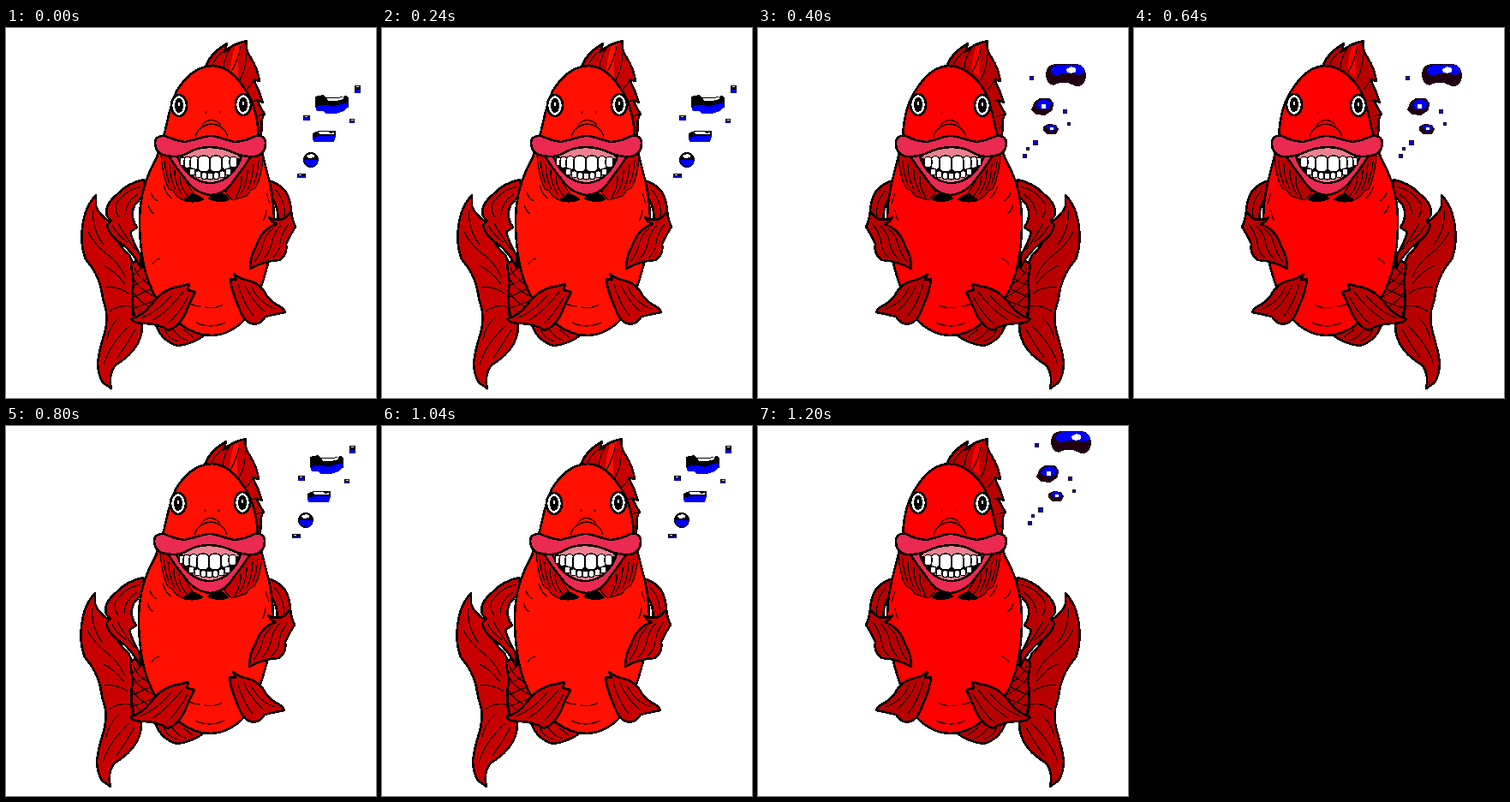
Recreate the animation shown at these times as an HTML page. Size 432 by 432 pixels, loop 1600 ms.

```html
<!DOCTYPE html>
<html lang="en">
<head>
<meta charset="utf-8">
<title>Smiling fish</title>
<style>
html, body { margin: 0; width: 100%; height: 100%; overflow: hidden; background: #fff; }
svg { display: block; width: 100vw; height: 100vh; shape-rendering: crispEdges; }
#fish { stroke: #000; stroke-width: 2.6; stroke-linejoin: round; stroke-linecap: round; }
.fin { fill: var(--fin); }
.body { fill: var(--body); }
.lip { fill: #ea2a50; }
.gum { fill: #ee8090; }
.white { fill: #fff; }
.line { fill: none; stroke-width: 1.2; }
.thin { stroke-width: 1.2; }
.plain { stroke: none; }
.blue { fill: #00f; }
#glossy { fill: #200010; }
</style>
</head>
<body>
<svg viewBox="0 0 432 432">
  <g id="fish">
    <g id="dorsal">
      <path class="fin" d="M233 45Q239 29 258 18L255 28Q265 18 281 15Q279 26 286 35Q294 48 296 62L289 60Q296 74 300 87L293 84Q298 95 302 100Q297 107 299 115L297 131L262 85Z"/>
      <path class="body plain" d="M262 50Q263 33 268 21L275 19Q270 36 271 57Z"/>
      <path class="line" d="M241 43Q246 32 255 27M254 46Q255 34 262 24M263 51Q271 38 274 21M273 61Q281 45 281 29M281 72Q287 66 289 60M288 86L293 84M292 103L300 101M294 117L299 115"/>
    </g>

    <g id="torso">
      <!-- tail -->
      <path class="fin" d="M105 195Q94 207 91 222Q85 249 93 270Q107 286 111 304Q113 318 117 330Q119 347 113 363Q109 377 107 390Q107 404 113 414L123 421Q119 407 127 394Q147 382 154 368Q161 354 158 341L149 337Q145 318 149 297Q152 281 144 265Q128 252 124 228Q109 219 105 208Z"/>
      <path class="line" d="M102 213Q100 235 114 253M96 238Q104 254 118 264Q132 274 140 292M113 277Q127 283 139 299M116 303Q131 301 143 310M121 331Q132 323 145 325M118 363Q121 347 133 337M114 393Q121 369 145 347M130 385Q141 370 151 352"/>
      <path class="fin" d="M146 276Q151 270 158 274L174 302L183 326L151 339Q145 320 149 298Z"/>
      <path class="line" d="M149 288Q157 283 160 278M149 301Q160 296 167 291M149 314Q164 307 173 303M149 327Q168 321 179 315M150 280Q154 292 169 300M150 294Q156 306 177 315M149 309Q156 321 171 327M149 323L160 334"/>

      <!-- arms behind the body -->
      <path class="fin" d="M161 177Q142 181 130 194Q114 207 118 220L123 225L118 230Q120 241 131 249Q148 260 158 281L157 265Q148 250 145 238L153 233Q144 220 150 207L163 192Z"/>
      <path class="line" d="M157 185Q138 190 129 205Q126 213 132 221M154 194Q140 203 139 218M124 230Q131 243 142 250M131 228Q138 241 151 259"/>
      <path class="fin" d="M307 178Q325 184 330 198Q334 210 333 222L317 227Q320 211 309 196Z"/>
      <path class="line" d="M314 188Q327 202 325 220"/>
      <path class="fin" d="M174 344Q181 366 201 371Q218 369 236 356L207 340Z"/>
      <path class="line" d="M185 352Q190 363 201 366M195 352Q203 363 212 365M207 352L219 361"/>

      <!-- body -->
      <path class="body" d="M242 44C222 44 207 60 199 74C191 91 189 108 185 123L176 151Q160 179 157 207C154 236 158 269 164 289C173 317 187 335 204 346Q221 359 240 359Q262 358 278 341C292 321 303 291 309 261C315 233 314 207 308 181L300 149L295 127C294 105 288 82 276 67Q262 46 242 44Z"/>
      <path class="line" d="M166 207Q168 214 173 217M169 192Q171 199 177 202M184 184Q188 196 194 199M304 193L308 205M304 213Q303 222 300 225M180 269Q174 270 171 276M182 307Q186 313 193 312M211 319Q218 325 227 325M233 326Q246 328 253 323M222 344Q238 352 256 344"/>

      <!-- front fins -->
      <path class="fin" d="M146 340Q160 335 169 324Q180 308 196 303Q206 301 214 299L212 306L221 308Q215 320 212 327Q205 347 190 353Q178 345 162 345Q149 345 146 340Z"/>
      <path class="line" d="M157 339Q177 332 194 311M172 341Q190 330 207 308M188 346Q202 334 213 313"/>
      <path class="fin" d="M266 287L269 294L262 293Q263 306 271 324Q277 342 286 345Q296 348 303 337Q314 334 326 332Q325 327 316 323Q306 317 302 308Q295 298 284 295Q273 293 266 287Z"/>
      <path class="line" d="M271 299Q278 323 289 336M279 300Q287 319 302 331M287 302Q295 321 315 328"/>
      <path class="fin" d="M307 221Q318 227 327 221L333 214Q334 224 338 232Q331 243 327 252Q329 265 319 271Q300 272 285 281Q285 266 292 255Q297 239 309 232L316 229Q310 227 307 221Z"/>
      <path class="line" d="M312 234Q302 242 300 254Q296 266 290 273M321 230Q311 241 310 253Q307 264 299 271M330 229Q321 240 320 252Q318 264 311 268"/>

      <!-- face -->
      <path class="line" d="M229 113Q239 102 251 113M225 119Q240 106 255 119M221 127Q226 112 240 112Q255 113 259 127M233 97l1 3M249 97l1 3"/>
      <g id="eyes"></g>

      <!-- gills and mouth -->
      <path class="fin thin" d="M181 149Q183 174 190 188L195 190L199 196L207 201L219 193L190 147ZM300 149Q299 174 291 187L285 190L281 196L264 201L256 192L287 147Z"/>
      <path class="line" d="M185 156Q187 172 191 181M191 159Q191 175 198 189M197 166Q196 178 205 194M203 173Q203 185 212 196M295 155Q294 172 289 182M289 159Q289 174 282 189M282 165Q283 179 274 194M275 173Q276 186 268 198"/>
      <path d="M208 201L218 194Q225 196 230 200Q220 204 208 201ZM237 199Q245 193 255 195L260 200Q250 204 237 199Z"/>
      <path class="lip" d="M189 147Q199 164 210 177Q221 193 239 195Q256 194 266 178Q277 164 288 147Z"/>
      <path d="M200 150Q206 164 215 172Q226 181 239 181Q254 180 263 170Q271 162 275 150L253 139L221 139Z"/>
      <path class="gum plain" d="M202 152Q213 138 238 139Q263 139 273 152Q238 160 202 152ZM216 170Q226 180 240 180Q253 179 261 169Z"/>
      <g id="teeth" class="white thin"></g>
      <path class="lip" d="M174 135Q174 125 186 126Q196 131 209 133Q222 130 232 127Q239 125 246 127Q255 130 267 133Q281 132 291 126Q303 124 303 135Q303 147 291 150Q279 151 267 146Q252 139 238 139Q224 139 212 146Q202 152 187 149Q175 147 174 135Z"/>
    </g>
  </g>

  <g id="shaded">
    <path d="M361 80L370 78L373 81H388L397 79L400 82V93H361Z"/>
    <path class="blue" d="M361 92L368 90H376L382 92L390 89L399 87V93L394 97L386 100H374L370 97H363Z"/>
    <path class="white" d="M375 82H389L394 80V83L386 85H376Z"/>
    <path d="M358 123L365 120H385V128H358Z"/>
    <path class="blue" d="M358 128L366 126H385L383 133H359Z"/>
    <path class="white" d="M365 121H376L379 123L383 122V124H366Z"/>
    <circle cx="356" cy="154" r="9"/>
    <path class="blue" d="M348 154H364L362 160L356 162L350 159Z"/>
    <path class="white" d="M350 149L356 147L360 148V151L354 152Z"/>
  </g>
  <g id="glossy">
    <path d="M336 54Q337 42 349 42H373Q383 44 383 56Q382 69 371 68L362 64H352L345 67Q336 65 336 54Z"/>
    <path class="blue" d="M342 51Q342 44 350 43H372Q381 44 381 51Q378 56 371 54Q361 51 354 54Q344 57 342 51Z"/>
    <path class="white" d="M360 48L366 45L371 47V51L366 53L361 52Z"/>
    <path d="M319 95L323 86L329 82H341L345 88L344 96L335 102L324 101Z"/>
    <path class="blue" d="M324 91L328 85L335 83L343 87L341 93L335 95L328 94Z"/>
    <path class="white" d="M331 89h5v5h-5z"/>
    <path d="M333 115L339 112L348 113L351 118L348 124H338L333 120Z"/>
    <path class="blue" d="M335 115L341 113L348 115V119L340 120Z"/>
    <path class="white" d="M341 116h4v3h-4z"/>
  </g>
</svg>
<script>
const $ = id => document.getElementById(id);
const add = (parent, name, attrs) => {
  const node = document.createElementNS("http://www.w3.org/2000/svg", name);
  for (const key in attrs) node.setAttribute(key, attrs[key]);
  parent.append(node);
};

for (const [cx, cy] of [[202, 90.5], [277, 89.5]]) {
  add($("eyes"), "ellipse", { cx, cy, rx: 9, ry: 12.5, class: "white" });
  add($("eyes"), "ellipse", { cx, cy, rx: 5, ry: 8.5, class: "plain" });
  add($("eyes"), "rect", { x: cx - 1, y: cy - 4, width: 2, height: 4, class: "white plain" });
}

// The teeth follow the curve of the smile.
const tooth = (x, y, width, height) =>
  add($("teeth"), "rect", { x, y, width, height, rx: Math.min(5, width / 2) });
for (const [x, w] of [[203, 6], [208, 8], [215, 10], [224, 14], [238, 14], [252, 10], [261, 9]]) {
  const bend = ((x + w / 2 - 238) / 34) ** 2;
  tooth(x, 149 + 2 * bend, w, 19 - 10 * bend);
}
for (let i = 0; i < 7; i++) {
  const bend = ((i - 3) / 3) ** 2;
  tooth(214 + i * 7, 169 - 5 * bend, 7, 8);
}

const drop = (x, y, w, h) => {
  const group = $("shaded");
  add(group, "rect", { x, y, width: w, height: h, rx: 1 });
  add(group, "rect", { x: x + 1, y: y + h / 2, width: w - 2, height: h / 2 - 0.5, class: "blue" });
  if (w > 5) add(group, "rect", { x: x + 2, y: y + 1, width: 3, height: 1, class: "white" });
};
drop(407, 67, 7, 9);
drop(347, 102, 8, 6);
drop(401, 106, 6, 5);
drop(340, 170, 10, 5);

for (const [x, y, size] of [[317, 56, 5], [356, 95, 5], [361, 110, 4], [321, 131, 6], [313, 139, 4], [309, 147, 5]]) {
  add($("glossy"), "rect", { x, y, width: size, height: size });
  add($("glossy"), "rect", { x: x + 1, y: y + 1, width: size - 2, height: size - 2, class: "blue" });
}

const STEP = 400;
const steps = [
  { flip: false, shift: 0, bubbles: [0, 0] },
  { flip: true, shift: 0, bubbles: [0, 0] },
  { flip: false, shift: -1, bubbles: [-6, -44] },
  { flip: true, shift: 0, bubbles: [6, -36] }
];

const show = ({ flip, shift, bubbles }) => {
  const fish = $("fish");
  fish.setAttribute("transform", `translate(${shift} 0)`);
  fish.style.setProperty("--fin", flip ? "#b80000" : "#c80000");
  fish.style.setProperty("--body", flip ? "#ff0000" : "#ff1000");
  $("torso").setAttribute("transform", flip ? "translate(464 0) scale(-1 1)" : "");
  $("dorsal").setAttribute("transform", flip ? "translate(-13 0)" : "");
  $("shaded").style.display = flip ? "none" : "";
  $("glossy").style.display = flip ? "" : "none";
  $(flip ? "glossy" : "shaded").setAttribute("transform", `translate(${bubbles})`);
};

const start = performance.now();
const tick = now => {
  const elapsed = Math.max(0, now - start);
  show(steps[Math.floor(elapsed / STEP) % steps.length]);
  requestAnimationFrame(tick);
};
tick(start);
</script>
</body>
</html>
```
